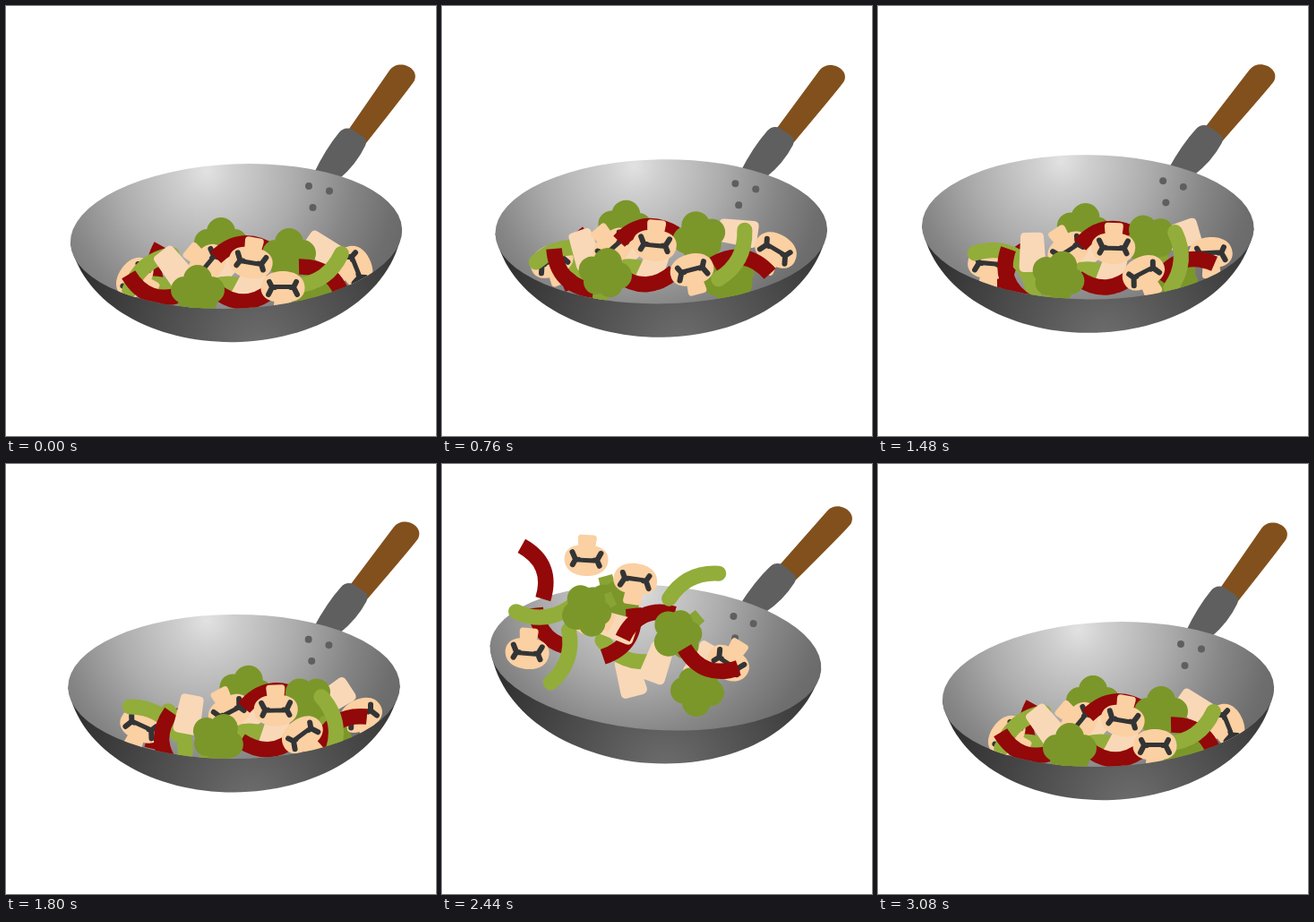
An HTML page with a canvas for the animation above (3120 ms loop, 480x480 px).

```html
<!DOCTYPE html>
<html lang="en">
<head>
<meta charset="utf-8">
<title>Stir fry</title>
<style>
html, body { margin: 0; width: 100%; height: 100%; overflow: hidden; background: #fff; }
canvas { display: block; width: 480px; height: 480px; }
</style>
</head>
<body>
<canvas id="stage"></canvas>
<script>
const LOOP = 3120, STEP = 40, RAD = Math.PI / 180;
const SLIDE = 1800, APEX = 2440, LANDED = 3060;
const RX = 185.3, RY = 80.6, TILT = -2.5;
const RED = '#930808', BEAN = '#92ad3a', FLORET = '#7b9729', STALK = '#88a434';
const MEAT = '#f9d8b7', CAP = '#fbd0a2', GILL = '#333436', STEEL = '#5f5f5f', WOOD = '#82501c';

const canvas = document.getElementById('stage');
const ctx = canvas.getContext('2d');
const ratio = window.devicePixelRatio || 1;
canvas.width = canvas.height = 480 * ratio;

// ---- Motion ----

const mix = (a, b, u) => a + (b - a) * u;
const smooth = (from, to, time) => {
  const u = Math.min(1, Math.max(0, (time - from) / (to - from)));
  return u * u * (3 - 2 * u);
};

// Monotone cubic through rows [time, a, b, c]
function track(rows) {
  const last = rows.length - 1;
  const slope = (i, k) => (rows[i + 1][k] - rows[i][k]) / (rows[i + 1][0] - rows[i][0]);
  const tangent = (i, k) => {
    if (i === 0 || i === last) return 0;
    const a = slope(i - 1, k), b = slope(i, k);
    return a * b <= 0 ? 0 : 2 * a * b / (a + b);
  };
  return time => {
    if (time <= rows[0][0]) return rows[0].slice(1);
    if (time >= rows[last][0]) return rows[last].slice(1);
    let i = 0;
    while (rows[i + 1][0] <= time) i++;
    const span = rows[i + 1][0] - rows[i][0], u = (time - rows[i][0]) / span, v = 1 - u;
    return [1, 2, 3].map(k => mix(rows[i][k], rows[i + 1][k], u * u * (3 - 2 * u))
      + span * u * v * (tangent(i, k) * v - tangent(i + 1, k) * u));
  };
}

// Pan centre and turn: two pulls to the left, then a toss
const home = [257, 257, 0], pulled = [219.5, 241, 5.3];
const pan = track([
  [200, ...home], [550, ...pulled], [890, ...home], [1280, ...pulled],
  [1640, 249, 251, 1.4], [1800, 254.5, 248.5, 2.3], [2120, 230, 197.5, 9.8], [2980, ...home]
]);

// How far loose food slides, hops and rolls inside the pan
const slosh = track([
  [200, 0, 0, 0], [760, -26, -14, .4], [1200, -10, -9, .5], [SLIDE, 34, -3, 1], [APEX, 0, 0, 0]
]);

function foodPose({ rest, air }, time) {
  const [homeX, homeY] = home, [airX, airY] = pan(APEX);
  const [x, y] = [rest[0] - homeX, rest[1] - homeY];
  const falling = time > APEX;
  const toss = falling ? 1 - smooth(APEX, LANDED, time) : smooth(SLIDE, APEX, time);
  const u = Math.min(1, Math.max(0, (time - APEX) / (LANDED - APEX)));
  const [slide, hop, roll] = slosh(time);
  const spin = falling ? 360 * Math.round((air[2] - rest[2]) / 360) : 0;
  return [
    mix(x, air[0] - airX, toss) + slide * (1 - Math.abs(x) / 170),
    mix(y, air[1] - airY, toss) + hop - 80 * u * (1 - u),
    mix(rest[2] + spin, air[2], toss) - .7 * x * roll
  ];
}

// ---- Shapes ----

function fill(path, color) {
  ctx.fillStyle = color;
  ctx.fill(typeof path === 'string' ? new Path2D(path) : path);
}

function stroke(path, color, width, cap) {
  ctx.strokeStyle = color;
  ctx.lineWidth = width;
  ctx.lineCap = cap;
  ctx.lineJoin = 'round';
  ctx.stroke(new Path2D(path));
}

function dots(list, color) {
  const path = new Path2D();
  for (const [x, y, r] of list) {
    path.moveTo(x + r, y);
    path.arc(x, y, r, 0, 7);
  }
  fill(path, color);
}

function radial(x, y, r, stops) {
  const g = ctx.createRadialGradient(x, y, 0, x, y, r);
  stops.forEach(([at, color]) => g.addColorStop(at, color));
  return g;
}

function placed([x, y, turn], draw) {
  ctx.save();
  ctx.translate(x, y);
  ctx.rotate(turn * RAD);
  draw();
  ctx.restore();
}

function mushroom() {
  fill('M-24.5 2C-24.5-11-13-17 0-17S24.5-11 24.5 2C24.5 11 17 16 9 17H-9C-17 16-24.5 11-24.5 2Z', CAP);
  stroke('M-15-5L-12 1L-16 9M15-5L12 1L16 9M-12 1H12', GILL, 6, 'round');
  fill('M-6 3H6Q8 3 8.500 6L10.500 25Q10.500 29 7 29H-7Q-10.500 29-10.500 25L-8.500 6Q-8 3-6 3Z', CAP);
}

function broccoli() {
  fill('M-9 8H9L8 34H-8Z', STALK);
  dots([[0, -12, 16], [-15, 0, 15], [15, 0, 15], [-8, 12, 14], [8, 12, 14]], FLORET);
}

function chicken() {
  fill('M-8-22H8Q13-22 13-17L15 16Q15 22 9 22H-9Q-15 22-15 16L-13-17Q-13-22-8-22Z', MEAT);
}

const pepper = () => stroke('M-32 11Q0-15 32 11', RED, 17.5, 'butt');
const bean = () => stroke('M-31 7Q0-11 31 7', BEAN, 17, 'round');

// Back to front: each piece lying in the pan and at the top of the toss
const food = [];
const add = (draw, rest, air) => food.push({ draw, rest, air });
add(broccoli, [240, 264, 0], [191, 158, 165]);
add(pepper, [168, 301, -100], [119, 191, -135]);
add(chicken, [354, 272, -55], [291, 221, 30]);
add(chicken, [238, 296, 45], [210, 238, -15]);
add(bean, [248, 312, 0], [205, 215, 202]);
add(chicken, [271, 313, 25], [240, 222, 20]);
add(bean, [180, 315, 20], [138, 217, 109]);
add(mushroom, [143, 303, -55], [95, 212, -175]);
add(bean, [157, 292, -40], [114, 169, 175]);
add(pepper, [163, 321, 200], [111, 117, 428]);
add(pepper, [265, 328, 180], [206, 194, 122]);
add(chicken, [187, 291, -38], [195, 182, -72]);
add(mushroom, [225, 289, 130], [161, 108, 183]);
add(pepper, [265, 267, -5], [226, 171, -25]);
add(mushroom, [391, 291, 68], [319, 223, 212]);
add(broccoli, [345, 322, 0], [285, 254, 185]);
add(broccoli, [316, 276, 0], [262, 191, -130]);
add(pepper, [359, 302, 38], [297, 227, -160]);
add(bean, [353, 300, 145], [278, 130, 333]);
add(mushroom, [273, 287, 190], [216, 128, 8]);
add(mushroom, [309, 313, 0], [164, 166, -65]);
add(broccoli, [214, 317, 0], [161, 164, -115]);

// ---- Pan ----

function drawHandle() {
  ctx.translate(-257, -257);
  fill('M381 140L428 72C438 58 462 69 456 83Q455 86 402 153Z', WOOD);
  fill('M343 188Q357 159 372 141Q377 135 385 137L399 146Q404 150 401 156Q391 177 372 193Z', STEEL);
}

function drawBowl() {
  const rim = new Path2D();
  rim.ellipse(0, 0, RX, RY, 0, 0, 7);
  fill(`M${-RX} 0C-172 74-88 118 0 118S172 74 ${RX} 0Z`, radial(20, 128, 240,
    [[0, '#6e6e6e'], [.3, '#585858'], [.6, '#434343'], [1, '#292929']]));
  fill(rim, radial(-30, -74, 250,
    [[0, '#e2e2e2'], [.12, '#cfcfcf'], [.4, '#acacac'], [.65, '#868686'], [.85, '#6e6e6e'], [1, '#666']]));
}

// Hides food behind the front of the rim
function clipToRim(x, y, turn) {
  const area = new Path2D(), open = new Path2D();
  open.rect(-480, -480, 960, 480);
  open.ellipse(0, 0, RX, RY, 0, 0, Math.PI);
  area.addPath(open, new DOMMatrix().translate(x, y).rotate(turn));
  ctx.clip(area);
}

function render(time) {
  ctx.setTransform(ratio, 0, 0, ratio, 0, 0);
  ctx.fillStyle = '#fff';
  ctx.fillRect(0, 0, 480, 480);

  const [x, y, turn] = pan(time);
  placed([x, y, turn], drawHandle);
  placed([x, y, turn + TILT], drawBowl);
  placed([x, y, turn], () => dots([[81, -56, 4], [104, -50.5, 4], [85.5, -32, 4]], STEEL));

  ctx.save();
  clipToRim(x, y, turn + TILT);
  ctx.translate(x, y);
  for (const piece of food) placed(foodPose(piece, time), piece.draw);
  ctx.restore();
}

function tick() {
  const time = performance.now() % LOOP;
  render(Math.floor(time / STEP) * STEP);
  requestAnimationFrame(tick);
}
tick();
</script>
</body>
</html>
```
